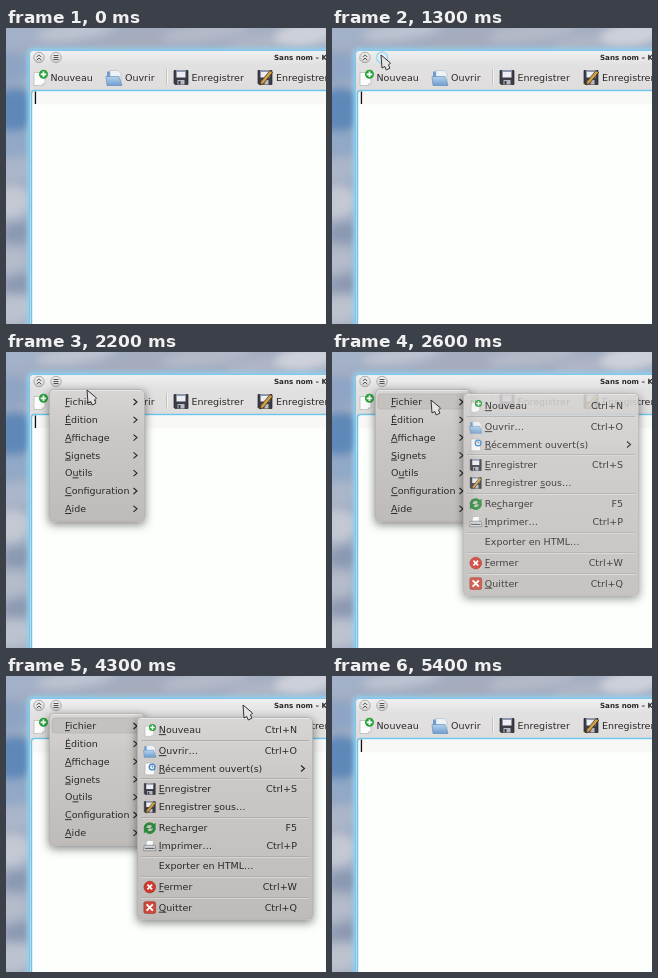
An HTML page for the animation above (5.9 s loop, 320 by 296 pixels).

```html
<!DOCTYPE html>
<html lang="fr">
<head>
<meta charset="utf-8">
<title>Menu</title>
<style>
  html, body { margin: 0; width: 100%; height: 100%; overflow: hidden; background: #9fabc0; }
  svg { display: block; width: 100%; height: 100%; }
  text { font: 9.5px "DejaVu Sans", sans-serif; fill: #2a2827; white-space: pre; }
  .u { text-decoration: underline; text-decoration-thickness: 1px; }
  .title { font-size: 7.1px; font-weight: bold; }
</style>
</head>
<body>
<svg viewBox="0 0 320 296" preserveAspectRatio="none">
  <defs>
    <linearGradient id="chrome" x2="0" y2="1">
      <stop stop-color="#f1f0f0"/><stop offset=".35" stop-color="#e2e1e1"/><stop offset="1" stop-color="#dfdddc"/>
    </linearGradient>
    <linearGradient id="panel" x2="0" y2="1">
      <stop stop-color="#d8d6d4"/><stop offset=".3" stop-color="#cbc8c6"/><stop offset="1" stop-color="#bfbbb9"/>
    </linearGradient>
    <linearGradient id="button" x2="0" y2="1">
      <stop stop-color="#f4f4f4"/><stop offset="1" stop-color="#cfcdcc"/>
    </linearGradient>
    <linearGradient id="folder" x2="0" y2="1">
      <stop stop-color="#b4d2ee"/><stop offset="1" stop-color="#6f9fd0"/>
    </linearGradient>
    <filter id="blur" x="-50%" y="-50%" width="200%" height="200%"><feGaussianBlur stdDeviation="4.500"/></filter>
    <filter id="halo" x="-10%" y="-10%" width="120%" height="120%"><feGaussianBlur stdDeviation="2.500"/></filter>
    <filter id="shadow" x="-20%" y="-20%" width="140%" height="150%">
      <feDropShadow dx="0" dy="3" stdDeviation="5" flood-color="#000" flood-opacity=".5"/>
    </filter>

    <g id="i-new">
      <path d="M2 3h11v11l-3 2H2z" fill="#fcfcfc" stroke="#b5b5b5" stroke-width=".7"/>
      <path d="M10 16v-2h3z" fill="#c8c8c8"/>
      <circle cx="11.500" cy="4.800" r="4.500" fill="#25a23a"/>
      <path d="M11.500 2v5.600M8.700 4.800h5.600" stroke="#fff" stroke-width="1.800"/>
    </g>
    <g id="i-open">
      <path d="M1 2h5l1 2h7v9H1z" fill="#6b9bd0"/>
      <path d="M4 1h8l3 3v10H4z" fill="#eef2f6" stroke="#a9b7c6" stroke-width=".6"/>
      <path d="M0 7h13l3 9H1z" fill="url(#folder)" stroke="#5a85b4" stroke-width=".6"/>
    </g>
    <g id="i-recent">
      <path d="M2 1h9l3 3v12H2z" fill="#fafafa" stroke="#aaa" stroke-width=".7"/>
      <circle cx="11" cy="6" r="4.500" fill="#3f86c9"/><circle cx="11" cy="6" r="2.800" fill="#eaf3fb"/>
      <path d="M11 4v2h1.500" fill="none" stroke="#235" stroke-width=".8"/>
    </g>
    <g id="i-save">
      <path d="M1 1h14v14H2l-1-1z" fill="#3c3d48" stroke="#23242c" stroke-width=".7"/>
      <path d="M3.500 1h9v7h-9z" fill="#eceef3"/><path d="M3.500 1h9v1.500h-9z" fill="#8b97b4"/>
      <path d="M4.500 10.500h7V15h-7z" fill="#b9bcc4"/><path d="M5.500 11.500h2V15h-2z" fill="#3c3d48"/>
    </g>
    <g id="i-saveas">
      <use href="#i-save"/>
      <path d="M4 12 13 1l2.500 2-9 11-3.500 1.500z" fill="#cfa24a" stroke="#4a3414" stroke-width=".8"/>
    </g>
    <g id="i-reload">
      <path d="M13 5A6 6 0 0 0 2 8M3 11a6 6 0 0 0 11-3" fill="none" stroke="#2c8a3c" stroke-width="3.600"/>
      <path d="M15.500 1v7.500H8zM.5 15V8h7.500z" fill="#2c8a3c"/>
    </g>
    <g id="i-print">
      <path d="M4 1h9l-1 7H3z" fill="#fbfbfb" stroke="#999" stroke-width=".6"/>
      <path d="M1 7h14l1 7H0z" fill="#d4d5d8" stroke="#6f7176" stroke-width=".8"/>
      <path d="M2 11h12" stroke="#55575c" stroke-width="1.400"/>
    </g>
    <g id="i-close">
      <circle cx="8" cy="8" r="7.500" fill="#cf3a2e" stroke="#a3241b" stroke-width=".7"/>
      <path d="m5 5 6 6m0-6-6 6" stroke="#fff" stroke-width="2.200"/>
    </g>
    <g id="i-quit">
      <rect x=".5" y=".5" width="15" height="15" rx="2" fill="#cc4a3c" stroke="#9c2a1d" stroke-width=".7"/>
      <path d="m4 4 8 8m0-8-8 8" stroke="#fff" stroke-width="2.400"/>
    </g>
  </defs>

  <rect width="320" height="296" fill="#a3aec2"/>
  <g id="sky" filter="url(#blur)"></g>

  <rect x="21.500" y="20.500" width="320" height="300" rx="5" fill="#8ed4f5" filter="url(#halo)"/>
  <rect x="23.500" y="22.500" width="320" height="300" rx="4" fill="#dfdddc" stroke="#7cc6ea"/>
  <path d="M24 63V27q0-4 4-4h292v40z" fill="url(#chrome)"/>
  <rect x="25.500" y="62.500" width="310" height="260" rx="3" fill="#fdfffd" stroke="#70c3ea" stroke-width="1.500"/>
  <path d="M27 64h293v12.500H27z" fill="#f8f8f7"/>
  <rect id="caret" x="28.800" y="63.500" width="1.300" height="12.500" fill="#111"/>

  <g fill="url(#button)" stroke="#9b9998" stroke-width=".8">
    <circle cx="33" cy="29.500" r="5.200"/><circle cx="50" cy="29.500" r="5.200"/>
  </g>
  <g fill="none" stroke="#555" stroke-width="1">
    <path d="m30.800 29 2.200-2.200 2.200 2.200m-4.400 3.200L33 30l2.200 2.200"/>
    <path d="M47.500 27.500h5m-5 2h5m-5 2h5"/>
  </g>
  <circle id="hover" cx="50" cy="29.500" r="5.500" fill="#e3eef2" stroke="#a5d9ee" stroke-width="1.600"/>
  <text class="title" x="268" y="32">Sans nom – KWrite</text>
  <g id="toolbar"></g>
  <path d="M160.500 41v16" stroke="#c3c1c0"/><path d="M161.500 41v16" stroke="#f4f4f4"/>

  <g id="menu"></g>
  <g id="submenu"></g>
  <path id="cursor" d="M0 0 1 13l2.800-1.500L5.300 15l3.600-1.800L7.500 10l2-2z"
        fill="#e4e4e4" stroke="#333" stroke-width="1" stroke-linejoin="round"/>
</svg>
<script>
const $ = id => document.getElementById(id);

// An underscore marks the accelerator letter that follows it.
const label = (x, y, text) =>
  `<text x="${x}" y="${y}">${text.replace(/_(.)/, '<tspan class="u">$1</tspan>')}</text>`;
const icon = (name, x, y, size) =>
  `<use href="#i-${name}" transform="translate(${x} ${y}) scale(${size / 16})"/>`;
const arrow = (x, y) =>
  `<path d="M${x} ${y - 3}l3.500 3-3.500 3" fill="none" stroke="#222" stroke-width="1.100"/>`;
const panel = (x, y, w, h) =>
  `<rect x="${x}" y="${y}" width="${w}" height="${h}" rx="3.500" fill="url(#panel)" stroke="#b3b0ae" stroke-width=".8" filter="url(#shadow)"/>
   <path d="M${x + 3} ${y + 1}h${w - 6}" stroke="#e9e7e6"/>`;

// x, y, rx, ry, colour
$('sky').innerHTML = [
  [8, 6, 26, 12, '#a3b1c9'], [70, 3, 40, 9, '#bcc2d0'], [130, 14, 45, 9, '#a6acbc'],
  [200, 4, 45, 9, '#b4b9c7'], [250, 15, 30, 8, '#b0b6c5'], [300, 6, 32, 12, '#cdd0d9'],
  [4, 40, 22, 16, '#8fa4c4'], [8, 82, 24, 22, '#5f88b8'], [8, 116, 22, 13, '#91a8c6'],
  [6, 142, 22, 12, '#aab6c9'], [4, 174, 22, 16, '#c3c8d3'], [14, 205, 18, 10, '#8b99b1'],
  [4, 232, 20, 12, '#b4bbc9'], [14, 256, 18, 9, '#8d9ab1'], [6, 282, 24, 14, '#bcc2ce']
].map(([x, y, rx, ry, c]) =>
  `<ellipse cx="${x}" cy="${y}" rx="${rx}" ry="${ry}" fill="${c}" transform="rotate(-8 ${x} ${y})"/>`).join('');

$('toolbar').innerHTML = [
  ['new', 26, 'Nouveau', 44.500], ['open', 100, 'Ouvrir', 119],
  ['save', 167, 'Enregistrer', 185.500], ['saveas', 251, 'Enregistrer sous…', 270]
].map(([name, ix, text, x]) => icon(name, ix, 41.500, 16) + label(x, 52.500, text)).join('');

const entries = ['_Fichier', '_Édition', '_Affichage', '_Signets', 'O_utils', '_Configuration', '_Aide'];
$('menu').innerHTML = panel(43.500, 37.500, 95, 131.500) +
  '<rect id="active" x="46" y="42" width="90" height="15" rx="3" fill="#c4c1bf" stroke="#b7b4b2" stroke-width=".8"/>' +
  entries.map((text, i) => label(59, 53.200 + i * 17.800, text) + arrow(127.500, 50 + i * 17.800)).join('');

const items = [
  [54, 'new', '_Nouveau', 'Ctrl+N'], [75, 'open', '_Ouvrir…', 'Ctrl+O'],
  [92.500, 'recent', '_Récemment ouvert(s)', ''], [113, 'save', '_Enregistrer', 'Ctrl+S'],
  [131, 'saveas', 'Enregistrer _sous…', ''], [152, 'reload', 'Re_charger', 'F5'],
  [170, 'print', '_Imprimer…', 'Ctrl+P'], [190, '', 'Exporter en HTML…', ''],
  [211, 'close', '_Fermer', 'Ctrl+W'], [231.500, 'quit', '_Quitter', 'Ctrl+Q']
];
const rules = [64.500, 102.500, 141.500, 180.500, 200.500, 221.500];
$('submenu').innerHTML = panel(131.500, 41.500, 175, 201.500) +
  rules.map(y => `<path d="M135 ${y}h168" stroke="#b0adab"/><path d="M135 ${y + 1}h168" stroke="#d8d6d4"/>`).join('') +
  items.map(([y, name, text, key]) =>
    (name ? icon(name, 137.500, y - 6.200, 12.500) : '') + label(152.800, y + 3.200, text) +
    `<text x="291" y="${y + 3.200}" text-anchor="end">${key}</text>`).join('') +
  arrow(295, 92.500);

const LOOP = 5900, STEP = 100;
const caretFlips = [100, 900, 1400, 1900, 2400, 2900, 3400, 4400, 4900, 5400];
// time, x, y of the pointer tip
const route = [
  [200, 324, 2], [500, 262, 10], [900, 130, 23], [1200, 55, 27], [1300, 49, 27], [2000, 49, 27],
  [2200, 81, 38], [2300, 93, 44.500], [2400, 99, 48], [3500, 99, 48],
  [3800, 148, 42], [4200, 233, 30], [4300, 237, 29], [4600, 237, 29], [5000, 324, -18]
];

function pointerAt(t) {
  const next = route.findIndex(p => p[0] > t);
  if (next < 1) return [340, -30];
  const [t0, x0, y0] = route[next - 1], [t1, x1, y1] = route[next];
  const k = (t - t0) / (t1 - t0);
  return [x0 + (x1 - x0) * k, y0 + (y1 - y0) * k];
}

const ramp = (t, from, to) => Math.min(1, Math.max(0, (t - from) / (to - from)));
const show = (id, alpha) => {
  $(id).style.opacity = alpha;
  $(id).style.display = alpha > 0 ? '' : 'none';
};

function draw(time) {
  const t = Math.floor(time % LOOP / STEP) * STEP;
  const closing = 1 - ramp(t, 4400, 4800);
  show('caret', caretFlips.filter(f => f <= t).length % 2 ? 0 : 1);
  show('hover', t >= 1200 && t < 1600 ? 1 : 0);
  show('menu', ramp(t, 1400, 1800) * closing);
  show('active', t >= 2300 ? 1 : 0);
  show('submenu', (1 - (1 - ramp(t, 2400, 2900)) ** 4) * closing);
  $('cursor').setAttribute('transform', `translate(${pointerAt(t)})`);
}

const start = performance.now();
(function tick() {
  draw(performance.now() - start);
  requestAnimationFrame(tick);
})();
</script>
</body>
</html>
```
